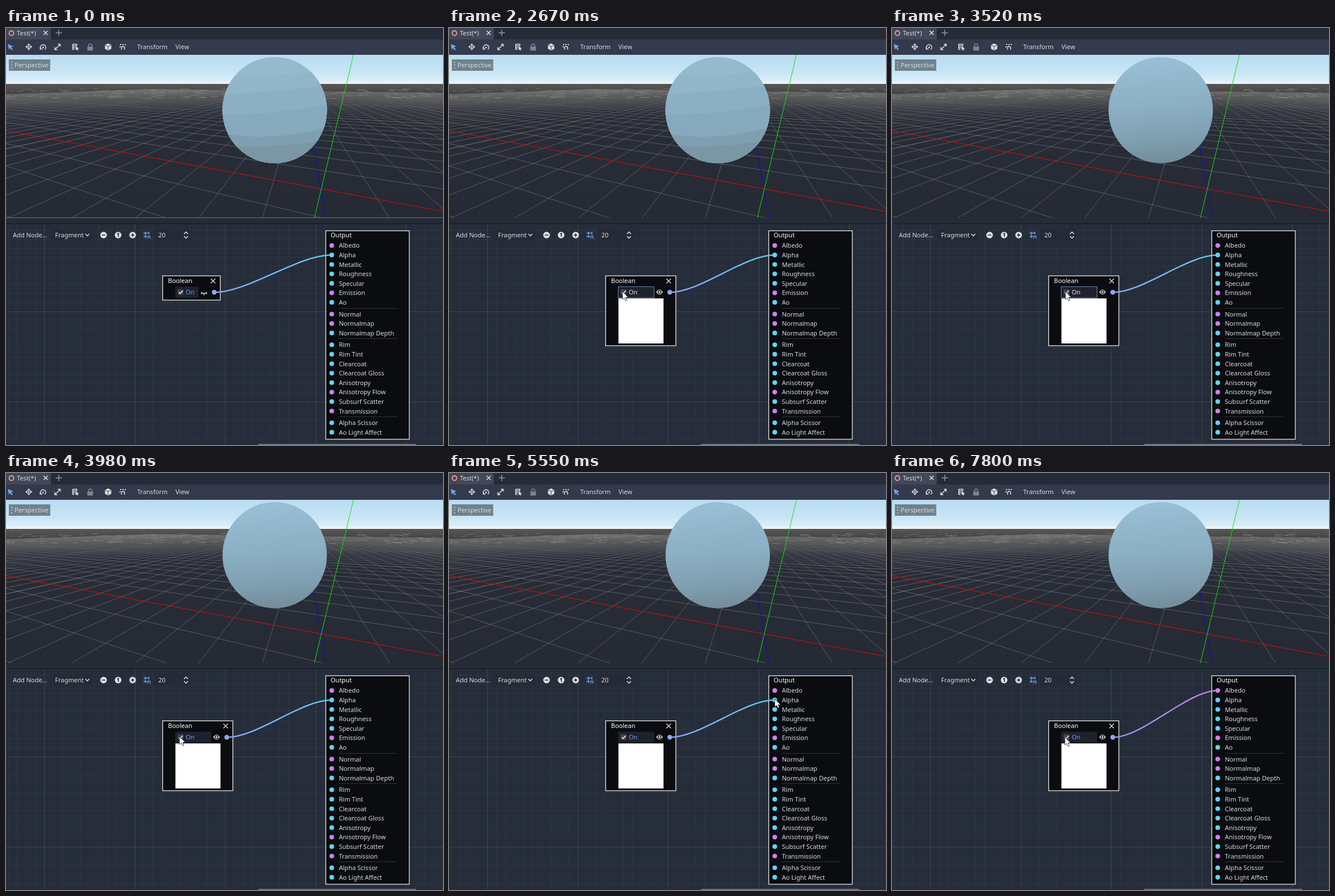
Recreate the animation shown at these times as an HTML page. Size 766x731 px, loop 8 s.

```html
<!DOCTYPE html>
<html lang="en">
<head>
<meta charset="utf-8">
<title>Shader graph</title>
<style>
html, body { margin: 0; width: 100%; height: 100%; overflow: hidden; background: #262c39; }
svg { display: block; width: 100vw; height: 100vh; }
text { font: 11px "Noto Sans", "Open Sans", sans-serif; fill: #d8dbe1; }
.ico { fill: none; stroke: #e0e0e0; stroke-width: 1.5; }
.solid { fill: #e0e0e0; }
</style>
</head>
<body>
<svg id="stage" viewBox="0 0 766 731" preserveAspectRatio="none">
  <defs>
    <linearGradient id="sky" x2="0" y2="1">
      <stop offset="0" stop-color="#b9dcf1"/><stop offset=".55" stop-color="#c6e4f5"/>
      <stop offset=".85" stop-color="#d8edf8"/><stop offset="1" stop-color="#f2f8fb"/>
    </linearGradient>
    <linearGradient id="ground" x2="0" y2="1">
      <stop offset="0" stop-color="#5a5755"/><stop offset=".04" stop-color="#4d4c4b"/>
      <stop offset=".1" stop-color="#3a3c41"/><stop offset=".2" stop-color="#292d37"/>
      <stop offset="1" stop-color="#252a35"/>
    </linearGradient>
    <linearGradient id="haze" gradientUnits="userSpaceOnUse" x1="0" x2="0" y1="104" y2="190">
      <stop offset="0" stop-color="#8f8d89" stop-opacity=".06"/>
      <stop offset=".3" stop-color="#9b9a96" stop-opacity=".3"/>
      <stop offset="1" stop-color="#a3a39f" stop-opacity=".5"/>
    </linearGradient>
    <linearGradient id="ball" x2=".08" y2="1">
      <stop offset="0" stop-color="#9ac1d7"/><stop offset=".5" stop-color="#8bafc3"/>
      <stop offset=".8" stop-color="#7f9fb1"/><stop offset="1" stop-color="#758f9d"/>
    </linearGradient>
    <linearGradient id="wireFill" gradientUnits="userSpaceOnUse" y1="0" y2="0">
      <stop id="wireA"/><stop id="wireB" offset="1"/>
    </linearGradient>
    <clipPath id="view"><rect y="47" width="766" height="286"/></clipPath>
    <clipPath id="ballClip"><ellipse cx="471" cy="144" rx="91.5" ry="93"/></clipPath>
  </defs>

  <rect width="766" height="21" fill="#262b38"/>
  <rect y="20" width="766" height="27" fill="#333a4c"/>
  <rect width="78.500" height="20" fill="#414858"/>
  <circle cx="9.500" cy="9" r="4" fill="none" stroke="#f49a9a" stroke-width="1.800"/>
  <text x="19" y="13">Test(*)</text>
  <path class="ico" d="M66 5l7 7m0-7l-7 7"/>
  <path d="M87 8.500h11m-5.500-5.500v11" stroke="#9297a3" stroke-width="1.500"/>
  <path d="M3 28l10 4-4 1.500 3 4-2 1.500-3-4-2 3z" fill="#6ea4f4"/>
  <path class="solid" d="M40 27l3 3.500h-6zM40 39l3-3.500h-6zM34 33l3.500-3v6zM46 33l-3.500-3v6z"/>
  <circle class="solid" cx="40" cy="33" r="1.600"/>
  <path class="ico" d="M61 36a4.600 4.600 0 1 1 7 1.500M60 33v4h4"/>
  <circle class="solid" cx="65" cy="34" r="1.500"/>
  <path class="ico" d="M86.500 37l7.500-7.500M91 28.500h4v4M85.500 33.500v4.500h4.500"/>
  <path class="ico" d="M117 28.500h8m-8 3h6m-6 3h4m-4 3h3M117 28v10M124 28v4"/>
  <path class="solid" d="M122 32l6 4-2.500.5 1 2.500-1.500.5-1-2-2 1z"/>
  <path d="M144.500 33v-2a3 3 0 0 1 6 0v2" fill="none" stroke="#80848f" stroke-width="1.500"/>
  <rect x="142.500" y="32.500" width="10" height="7" rx="1" fill="#80848f"/>
  <path class="solid" d="M179 27l5.500 2.700v6.800L179 39.500l-5.500-3v-6.800z"/>
  <path d="M174 30l5 2.500 5-2.500M179 32.500v6.500" fill="none" stroke="#333a4c"/>
  <path class="ico" d="M202.500 38v-3a2.700 2.700 0 0 1 5.400 0v3"/>
  <path class="solid" d="M200 28h2v2h-2zM204 28h2v2h-2zM208 28h2v2h-2zM199 32h2v2h-2z"/>
  <text x="230" y="37">Transform</text>
  <text x="297" y="37">View</text>

  <g clip-path="url(#view)">
    <rect y="47" width="766" height="52" fill="url(#sky)"/>
    <rect y="98" width="766" height="236" fill="url(#ground)"/>
    <g id="floor" fill="none"></g>
    <path d="M521 99L540 210" stroke="#0808e0" stroke-dasharray="6 4"/>
    <path d="M540 210L552 282 561 333" stroke="#0808e0" stroke-dasharray="14 1" fill="none"/>
    <path d="M0 180L766 321.500" stroke="#e00808"/>
    <path d="M609 47L540.500 333" stroke="#08e808"/>
    <g id="sphere">
      <ellipse cx="471" cy="144" rx="91.500" ry="93" fill="url(#ball)"/>
      <g id="bands" clip-path="url(#ballClip)"></g>
    </g>
    <path id="edge" d="M0 332.500H766" stroke="#6b707b"/>
  </g>
  <rect x="5" y="55" width="72.500" height="20" fill="#6f818c"/>
  <path d="M9 59h2v2h-2zM9 64h2v2h-2zM9 69h2v2h-2z" fill="#b7c3ca"/>
  <text x="15" y="69">Perspective</text>

  <rect y="333" width="766" height="11" fill="#252b37"/>
  <rect y="343" width="766" height="388" fill="#262d3a"/>
  <g id="grid" stroke="#fff"></g>
  <path d="M0 343H766" stroke="#1c212a" stroke-width="2"/>

  <text x="12" y="367">Add Node...</text>
  <rect x="79" y="352" width="72" height="21" fill="#252a36"/>
  <text x="86" y="367">Fragment</text>
  <path class="ico" d="M139 361l3.500 3.500 3.500-3.500"/>
  <g class="solid"><circle cx="171" cy="363" r="5.800"/><circle cx="196.500" cy="363" r="5.800"/><circle cx="222" cy="363" r="5.800"/></g>
  <path d="M168 363h6M219 363h6m-3-3v6M195 361.500l2-1.500v6" fill="none" stroke="#252a36" stroke-width="1.600"/>
  <path d="M241 359.500h10M241 365.500h6M244.500 357v11M250.500 357v5" fill="none" stroke="#6a9eea" stroke-width="1.500"/>
  <path d="M248.500 369v-2.500a2 2 0 0 1 4 0v2.500" fill="none" stroke="#6a9eea" stroke-width="1.500"/>
  <rect x="260" y="352" width="63" height="21" fill="#252a36"/>
  <text x="267" y="367">20</text>
  <path class="ico" d="M312 361l3.500-3.500 3.500 3.500M312 365l3.500 3.500 3.500-3.500"/>
  <rect x="442" y="729" width="277" height="3" rx="1" fill="#6b717e"/>

  <g id="output"></g>

  <rect id="box" x="274.600" y="434.500" fill="#08090d" fill-opacity=".92" stroke="#f2f2f2" stroke-width="1.200"/>
  <text x="284" y="446.500" style="fill:#fff">Boolean</text>
  <rect id="field" x="296.500" y="453.500" height="19.500" fill="#1d222d"/>
  <rect x="301" y="458" width="10" height="10" rx="1" fill="#41444c"/>
  <path id="tick" d="M303 463l2.300 2.500 4.500-5" fill="none" stroke="#eee" stroke-width="1.700"/>
  <text id="on" x="315" y="467.300">On</text>
  <rect id="preview" x="297" y="474" width="79" height="79"/>
  <g id="right">
    <path class="ico" d="M359 439.500l8 8m0-8l-8 8" style="stroke-width:1.300"/>
    <path id="shut" d="M342 463q5 5 10 0M343 465l-1 1.500M347 466.500v2M351 465l1 1.500" class="ico"/>
    <g id="open">
      <path d="M341.300 463q5.700-8.500 11.400 0q-5.700 8.500-11.400 0z" fill="#eee"/>
      <circle cx="347" cy="463" r="2.500" fill="#eee" stroke="#111" stroke-width="1.500"/>
    </g>
  </g>
  <path id="wire" fill="none" stroke="url(#wireFill)" stroke-width="2.300"/>
  <g id="ports"></g>
  <circle id="outPort" cy="463.300" r="4.200" fill="#8ea5f4"/>

  <circle id="glow" r="9.500" fill="#f4ea00" fill-opacity=".65"/>
  <path id="cursor" d="M0 0V14L3.200 11.200 5.500 16 8 15 5.800 10.200H10.300Z" fill="#fff" stroke="#111" stroke-width=".8"/>
</svg>
<script>
const $ = id => document.getElementById(id);
const BLUE = '#8ea5f4', CYAN = '#60d3f3', PINK = '#d27fe9';
const LOOP = 8000;

// Ground plane: homogeneous point from the origin and two vanishing points
const A = .0905, B = .222;
function project(u, v) {
  const w = 1 + A * u + B * v;
  return [(552 - 444 * A * u + 520 * B * v) / w, (282 + 98 * (w - 1)) / w];
}
function floorLine(p, q, major) {
  return `<path d="M${p.map(n => n.toFixed(1))}L${q.map(n => n.toFixed(1))}"
    stroke="url(#haze)" stroke-width="${major ? 1.1 : .8}"/>`;
}
function drawFloor() {
  const N = 60, near = .5;
  let out = '';
  for (let i = -N; i <= N; i++) {
    if (!i) continue;
    const major = i % 10 === 0;
    const v0 = Math.max(-N, (near - 1 - A * i) / B);
    const u0 = Math.max(-N, (near - 1 - B * i) / A);
    if (v0 < N) out += floorLine(project(i, v0), project(i, N), major);
    if (u0 < N) out += floorLine(project(u0, i), project(N, i), major);
  }
  let seed = 7;
  const rnd = () => (seed = seed * 16807 % 2147483647) / 2147483647;
  for (let i = 0; i < 150; i++) {
    const x = rnd() * 766, y = 106 + rnd() * 18, len = 3 + rnd() * 14;
    out += `<path d="M${x} ${y}l${len} ${(x - 300) / 6000 * len}" stroke="#aaa7a2" stroke-opacity=".5" stroke-width=".8"/>`;
  }
  $('floor').innerHTML = out;
}

function drawGrid() {
  const gap = 15.86;
  let out = '';
  const add = (d, i) => out += `<path d="${d}" stroke-opacity="${i % 10 ? .035 : .11}"/>`;
  for (let i = -4; i < 45; i++) add(`M${Math.round(68 + i * gap) - .5} 343V731`, i);
  for (let i = 1; i < 25; i++) add(`M0 ${Math.round(339 + i * gap) - .5}H766`, i);
  $('grid').innerHTML = out;
}

// '*' marks a vector input, '-' a separator
const ROWS = '*Albedo,Alpha,Metallic,Roughness,Specular,*Emission,Ao,-,*Normal,*Normalmap,Normalmap Depth,-,Rim,Rim Tint,Clearcoat,Clearcoat Gloss,Anisotropy,*Anisotropy Flow,Subsurf Scatter,*Transmission,-,Alpha Scissor,Ao Light Affect';
function drawOutput() {
  let y = 381.3, dots = '';
  let out = `<rect x="560.5" y="355.5" width="146.4" height="365.4" fill="#08090d" fill-opacity=".92" stroke="#f2f2f2" stroke-width="1.2"/>
    <text x="569" y="367.3" style="fill:#fff">Output</text>`;
  for (const row of ROWS.split(',')) {
    if (row === '-') {
      out += `<path d="M583 ${Math.round(y - 7) + .5}H686" stroke="#303238"/>`;
      y += 4;
      continue;
    }
    const vector = row[0] === '*';
    out += `<text x="583.5" y="${y + 4}">${row.replace('*', '')}</text>`;
    dots += `<circle cx="571" cy="${y}" r="4.1" fill="${vector ? PINK : CYAN}"/>`;
    y += 16.6;
  }
  $('output').innerHTML = out;
  $('ports').innerHTML = dots;
}

// Flat shading steps: left, middle and right height of each upper edge
function drawBands() {
  const cuts = [
    [40, 40, 40, '#95bace'], [84, 84, 76, '#91b5c9'], [116, 112, 100, '#8cafc3'],
    [152, 152, 134, '#87a9bd'], [185, 200, 174, '#7f9fb1'], [206, 212, 196, '#7a97a6']
  ];
  $('bands').innerHTML = cuts.map(([l, m, r, color]) =>
    `<path d="M379 ${l}Q471 ${m} 563 ${r}V240H379Z" fill="${color}"/>`).join('');
}

// Pointer moves: first step, last step, number of steps, x, y
const START = [634, 685];
const MOVES = [
  [150, 700, 8, 339, 462], [870, 950, 2, 345, 460], [1180, 1330, 3, 347, 462],
  [1880, 1940, 2, 358, 462], [2120, 2350, 4, 304, 462], [4855, 5400, 8, 566, 397],
  [5470, 5550, 2, 571, 396], [5770, 5940, 3, 546, 409], [6170, 6240, 2, 562, 398],
  [6400, 6640, 4, 569.5, 378], [7110, 7340, 4, 375, 456], [7660, 7800, 3, 303, 463]
];
// Checkbox clicks: press, glow off, release
const TOGGLES = [[2580, 2670, 2730], [3050, 3130, 3210], [3450, 3520, 3600],
  [3840, 3910, 3980], [4230, 4300, 4380], [4620, 4700, 4780]];

const smooth = k => k * k * (3 - 2 * k);
const within = (t, a, b) => t >= a && t < b;

function pointer(t) {
  let [x, y] = START;
  for (const [a, b, n, tx, ty] of MOVES) {
    if (t < a) break;
    const step = Math.min(n, 1 + Math.floor((t - a) / (b - a) * (n - 1) + 1e-6));
    const k = smooth(step / n);
    x += (tx - x) * k;
    y += (ty - y) * k;
  }
  return [x, y];
}

const show = (id, on) => $(id).setAttribute('visibility', on ? 'visible' : 'hidden');
function set(id, attrs) {
  for (const key in attrs) $(id).setAttribute(key, attrs[key]);
}

function drawWire(x, t, px, py) {
  let end = [571, 397.9], color = CYAN;
  const y = 463.3;
  if (t >= 6640) { end = [571, 381.3]; color = PINK; }
  else if (t >= 6480) { end = [571, 381.3]; color = BLUE; }
  else if (t >= 5770) { end = [px, py]; color = BLUE; }
  const c = (end[0] - x) * .29;
  set('wire', { d: `M${x} ${y}C${x + c} ${y} ${end[0] - c} ${end[1]} ${end}` });
  set('wireFill', { x1: x, x2: end[0] });
  set('wireA', { 'stop-color': BLUE });
  set('wireB', { 'stop-color': color });
}

function render(t) {
  const [px, py] = pointer(t);
  const wide = t >= 1640, shift = wide ? 22 : 0;
  const checked = TOGGLES.filter(c => t >= c[2]).length % 2 === 0;
  const pressed = TOGGLES.some(c => within(t, c[0], c[2]));
  const glow = within(t, 1480, 1640) || within(t, 5630, 6930) ||
    TOGGLES.some(c => within(t, c[0], c[1]));

  show('cursor', t >= 150);
  set('cursor', { transform: `translate(${px} ${py})` });
  show('glow', glow);
  set('glow', { cx: px, cy: py + .7 });

  show('edge', t < 1560);
  show('sphere', checked);
  show('bands', checked && t < 3210);

  set('box', { width: 101 + shift, height: wide ? 122.4 : 42.5 });
  set('field', { width: wide ? 63 : 41, stroke: pressed ? '#6482b4' : 'none' });
  set('right', { transform: `translate(${shift} 0)` });
  show('shut', t < 1560);
  show('open', t >= 1560);
  show('tick', checked);
  $('on').style.fill = checked && !pressed ? '#6a9eea' : '#e4e6ea';
  show('preview', wide);
  set('preview', { fill: checked ? '#fff' : '#000' });
  set('outPort', { cx: 365 + shift });
  drawWire(365 + shift, t, px, py);
}

drawFloor();
drawGrid();
drawOutput();
drawBands();
const begin = performance.now();
function tick() {
  render((performance.now() - begin) % LOOP);
  requestAnimationFrame(tick);
}
tick();
</script>
</body>
</html>
```
